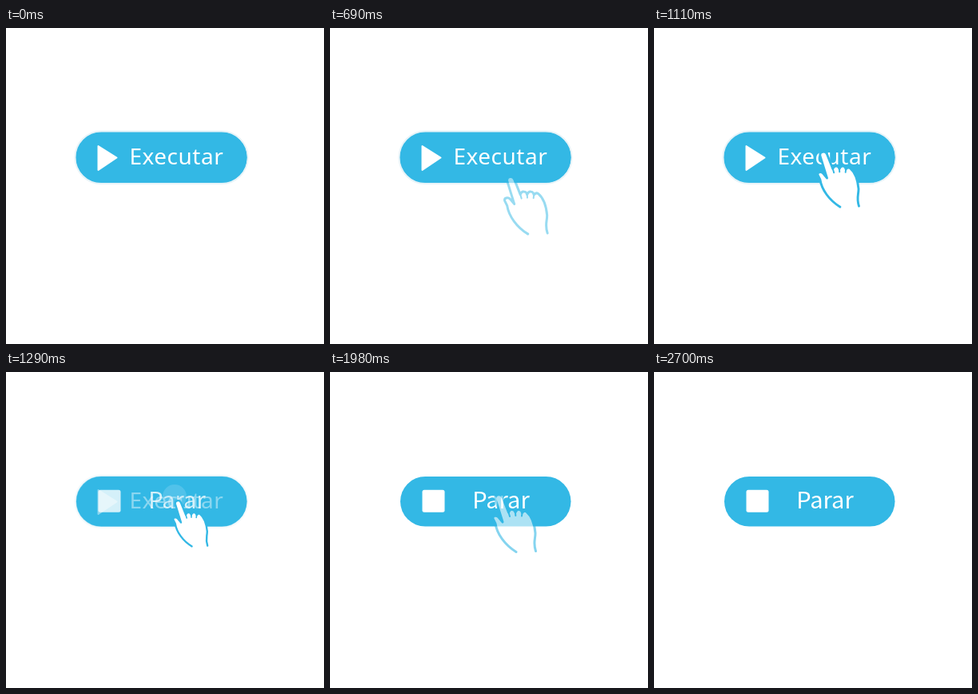
Write an HTML page that moves like this. It is 398 px wide and 396 px high and loops after 5430 ms.

```html
<!DOCTYPE html>
<html lang="pt">
<head>
<meta charset="utf-8">
<title>Executar / Parar</title>
<style>
  html, body { margin: 0; width: 100%; height: 100%; overflow: hidden; background: #fff; }
  svg { display: block; }
  .run { font: 28px "Noto Sans", sans-serif; letter-spacing: 0.5px; }
  .halt { font: 29px "Noto Sans CJK JP", "Noto Sans CJK SC", "Noto Sans", sans-serif; }
</style>
</head>
<body>
<svg width="398" height="396" viewBox="0 0 398 396">
  <rect id="rim" x="86.5" y="129.5" width="216" height="65.5" rx="32.7" fill="#33b8e5" stroke="#e6f3f8" stroke-width="2"/>
  <rect x="88" y="131" width="213.5" height="62.5" rx="31.2" fill="#33b8e5"/>
  <g id="play" fill="#fff">
    <path d="M115.5 148 138.5 162.5 115.5 178Z" stroke="#fff" stroke-width="2" stroke-linejoin="round"/>
    <text class="run" x="154.5" y="171">Executar</text>
  </g>
  <g id="stop" fill="#fff">
    <rect x="115.5" y="147.7" width="28" height="28" rx="2.5"/>
    <text class="halt" x="178.3" y="171">Parar</text>
  </g>
  <circle id="ripple" cx="211" cy="156" fill="#a0e0f7"/>
  <g id="hand" fill="#fff" stroke="#33b8e5" stroke-width="3" stroke-linecap="round" stroke-linejoin="round">
    <path d="M233 225.5C219 217 209 203 207 190L204 184C203 180 208 179 211 182L216 188
      207 159C206 153 214 152 216 157L223.5 176Q225 171.5 228.5 172.5 231.5 173 232 176
      234 171.5 237 172.5 240 173 240.5 176.5 243 173 246 175C252 180 256 191 257 202
      257 210 254 214 257.5 224.5"/>
    <path d="M223.5 176 225 181M232 176 232.3 180M240.5 176.5 240 180.5" stroke-width="2"/>
  </g>
</svg>
<script>
  const LOOP = 5430;
  const [rim, play, stop, ripple, hand] =
    ["rim", "play", "stop", "ripple", "hand"].map(id => document.getElementById(id));

  const ramp = (t, a, b) => Math.min(1, Math.max(0, (t - a) / (b - a)));
  const ease = p => p < 0.5 ? 2 * p * p : 1 - 2 * (1 - p) ** 2;
  const fade = (el, value) => el.setAttribute("opacity", value);

  function draw(t) {
    const gone = ramp(t, 1200, 1360);
    fade(rim, 1 - gone);
    fade(play, 1 - gone);
    fade(stop, ramp(t, 1200, 1315));

    // The hand glides in, presses and fades away.
    const away = 1 - ease(ramp(t, 500, 900));
    const press = ease(ramp(t, 1050, 1250)) - ease(ramp(t, 1300, 1540));
    fade(hand, ramp(t, 520, 860) * (1 - ramp(t, 1780, 2280)));
    hand.setAttribute("transform",
      `translate(${231 + 27 * away} ${190.5 + 60 * away}) scale(${1 - 0.2 * press}) translate(-231 -190.5)`);

    const spread = ramp(t, 1200, 1560);
    ripple.setAttribute("r", 34 * (1 - (1 - spread) ** 2));
    fade(ripple, t < 1200 ? 0 : 0.3 * (1 - ramp(t, 1250, 1710)));
  }

  const start = performance.now();
  function tick() {
    draw((performance.now() - start) % LOOP);
    requestAnimationFrame(tick);
  }
  tick();
</script>
</body>
</html>
```
